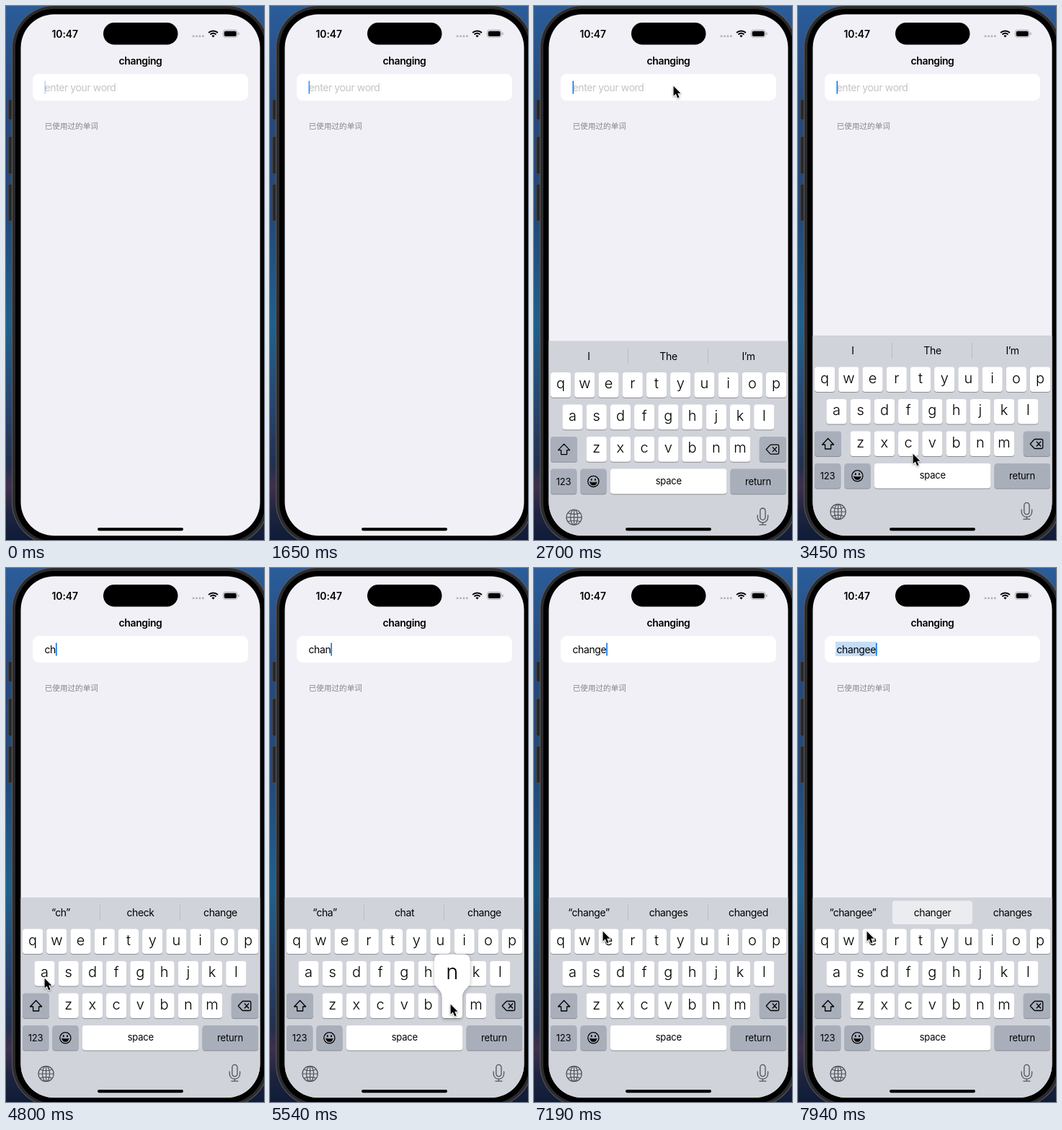
An HTML page with a canvas that plays this animation: 358 px wide and 739 px high, repeating every 8000 ms.

```html
<!DOCTYPE html>
<html lang="zh-CN">
<head>
<meta charset="utf-8">
<title>Word game</title>
<style>
  html, body { margin: 0; width: 100%; height: 100%; overflow: hidden; background: #000; }
  canvas { display: block; width: 358px; height: 739px; }
</style>
</head>
<body>
<canvas id="stage"></canvas>
<script>
const W = 358, H = 739, LOOP = 8000;
const canvas = document.getElementById('stage');
const ctx = canvas.getContext('2d');
const dpr = window.devicePixelRatio || 1;
canvas.width = Math.round(W * dpr);
canvas.height = Math.round(H * dpr);

const SANS = 'Inter, Roboto, sans-serif';
const BLUE = '#127cf5';
const KEY_W = 28.2, KEY_H = 34.6, KEY_PITCH = 33.22, ROW_PITCH = 44.5;
const KEYBOARD_TOP = 456;
const CENTERS = [76, 186.5, 297.5];

// Letter keys: name -> position
const keys = {};
[['qwertyuiop', 23], ['asdfghjkl', 39.4], ['zxcvbnm', 72.6]].forEach(([letters, left], row) =>
  [...letters].forEach((letter, i) => {
    keys[letter] = { x: left + i * KEY_PITCH, y: 499.5 + row * ROW_PITCH };
  }));

// [time, typed text, suggestions, middle one highlighted, pressed key]
const states = [
  [0, '', ['I', 'The', 'I’m']],
  [3750, 'c', ['I', 'The', 'I’m'], false, 'c'],
  [3900, 'c', ['“c”', 'can', 'cat']],
  [4500, 'ch', ['“c”', 'can', 'cat'], false, 'h'],
  [4650, 'ch', ['“ch”', 'check', 'change']],
  [4950, 'cha', ['“ch”', 'check', 'change'], false, 'a'],
  [5100, 'cha', ['“cha”', 'chat', 'change']],
  [5540, 'chan', ['“cha”', 'chat', 'change'], false, 'n'],
  [5690, 'chan', ['“chan”', 'Chan', 'change'], true],
  [6140, 'chang', ['“chan”', 'Chan', 'change'], true, 'g'],
  [6290, 'chang', ['“chang”', 'change', 'changes'], true],
  [7040, 'change', ['“chang”', 'change', 'changes'], true, 'e'],
  [7190, 'change', ['“change”', 'changes', 'changed']],
  [7640, 'changee', ['“change”', 'changes', 'changed'], false, 'e'],
  [7790, 'changee', ['“changee”', 'changer', 'changes'], true],
];

const pointerPath = [
  [2100, 193, 110], [3000, 193, 110], [3400, 159, 619], [3450, 159, 619],
  [3650, 156, 594], [4150, 156, 594], [4500, 217, 567], [4560, 217, 567],
  [4800, 53, 567], [5240, 53, 567], [5540, 250, 603], [5700, 250, 603],
  [6050, 197, 571], [6440, 197, 571], [6890, 95, 502], [8000, 95, 502],
];

const caretBlink = [
  [0, .32], [150, 0], [600, 0], [750, .5], [900, 1], [1050, .5], [1200, 0], [1500, 0],
  [1650, .8], [1800, 1], [1950, 1], [2100, .4], [2250, 0], [2400, 1], [8000, 1],
];

function sample(track, t, ease = u => u) {
  const i = Math.max(1, track.findIndex(point => point[0] >= t));
  const a = track[i - 1], b = track[i];
  const u = ease(Math.min(1, Math.max(0, (t - a[0]) / (b[0] - a[0]))));
  return a.slice(1).map((v, k) => v + (b[k + 1] - v) * u);
}
const smooth = u => u * u * (3 - 2 * u);

function box(x, y, w, h, r, fill) {
  ctx.beginPath();
  ctx.roundRect(x, y, w, h, r);
  ctx.fillStyle = fill;
  ctx.fill();
}

function text(str, x, y, { size = 14, weight = 400, color = '#000', align = 'center', spacing = -0.4, family = SANS } = {}) {
  ctx.font = `${weight} ${size}px ${family}`;
  ctx.letterSpacing = spacing + 'px';
  ctx.textAlign = align;
  ctx.fillStyle = color;
  ctx.fillText(str, x, y);
  return ctx.measureText(str).width;
}

function stroke(path, x, y, color, width, fill) {
  ctx.save();
  ctx.translate(x, y);
  ctx.lineWidth = width;
  ctx.lineJoin = ctx.lineCap = 'round';
  ctx.strokeStyle = color;
  const shape = new Path2D(path);
  ctx.stroke(shape);
  if (fill) {
    ctx.fillStyle = fill;
    ctx.fill(shape);
  }
  ctx.restore();
}

function drawPhone() {
  const sky = ctx.createLinearGradient(0, 0, 0, H);
  [[0, '#2a5d9a'], [.17, '#27497c'], [.4, '#234a7a'], [.6, '#20608a'], [.75, '#28456e'],
   [.86, '#22304f'], [.9, '#40304c'], [.95, '#1d2440'], [1, '#0f1b38']]
    .forEach(([stop, color]) => sky.addColorStop(stop, color));
  ctx.fillStyle = sky;
  ctx.fillRect(0, 0, W, H);

  [[129, 29], [180, 53], [246, 52]].forEach(([y, h]) => {
    box(3, y, 7, h, 1.5, '#4a4a4c');
    box(3.8, y + 1, 6, h - 2, 1, '#29292b');
  });
  box(8, -1, 357, 747, 59, '#5a5a5c');
  box(9, 0, 355, 745, 58, '#2b2b2d');
  box(13, 4, 347, 737, 54, '#000');
  box(20.5, 11.5, 332, 721.5, 46.5, '#f1f0f6');
}

function drawStatusBar() {
  text('10:47', 81.7, 43.5, { weight: 600, spacing: -0.1 });
  box(135, 23, 103.5, 30.5, 15.25, '#000');
  for (let i = 0; i < 4; i++) box(258.6 + i * 4.45, 40.4, 2.8, 2.8, 1.4, '#abaab0');

  ctx.strokeStyle = '#000';
  ctx.lineWidth = 2;
  [9, 5.6].forEach(r => {
    ctx.beginPath();
    ctx.arc(287.5, 43.4, r, -Math.PI * .75, -Math.PI * .25);
    ctx.stroke();
  });
  ctx.beginPath();
  ctx.moveTo(287.5, 43.6);
  ctx.arc(287.5, 43.4, 3, -Math.PI * .75, -Math.PI * .25);
  ctx.fillStyle = '#000';
  ctx.fill();

  ctx.beginPath();
  ctx.roundRect(301.3, 33.3, 19.8, 10, 3.2);
  ctx.strokeStyle = '#a2a1a7';
  ctx.lineWidth = .9;
  ctx.stroke();
  box(302.7, 34.7, 17, 7.2, 2, '#000');
  box(322.3, 36.7, 1.2, 3.4, .6, '#a2a1a7');
}

function drawForm(typed, selected, caretAlpha) {
  text('changing', 186.5, 81, { weight: 600 });
  box(37, 94, 299, 37, 8.5, '#fff');

  const left = { align: 'left' };
  ctx.font = `400 14px ${SANS}`;
  ctx.letterSpacing = '-0.4px';
  const width = typed ? ctx.measureText(typed).width : 0;
  if (selected) box(52, 102, width + 2, 20, 0, '#c5ddf9');
  if (typed) text(typed, 53.5, 118, left);
  else text('enter your word', 53.5, 118, { ...left, color: '#c4c4c7' });

  ctx.globalAlpha = caretAlpha;
  box(53.5 + width, 103.5, 1.7, 18.3, .8, BLUE);
  ctx.globalAlpha = 1;

  text('已使用过的单词', 53.7, 169.8, {
    ...left, size: 10.6, spacing: 0, color: '#85858a',
    family: '"Noto Sans CJK SC", "Noto Sans CJK", sans-serif',
  });
}

function drawKey(x, y, w, fill) {
  box(x, y + 1, w, KEY_H, 4, '#8b8d93');
  box(x, y, w, KEY_H, 4, fill);
}

function drawPopup(letter) {
  const { x, y } = keys[letter];
  const l = x - 10.7, r = x + KEY_W + 10.7, top = y - 54, bottom = y + KEY_H;
  ctx.save();
  ctx.shadowColor = 'rgba(0,0,0,.28)';
  ctx.shadowBlur = 5 * dpr;
  ctx.shadowOffsetY = dpr;
  ctx.fillStyle = '#fff';
  ctx.beginPath();
  ctx.moveTo(l, top + 8);
  ctx.arcTo(l, top, l + 8, top, 8);
  ctx.arcTo(r, top, r, top + 8, 8);
  ctx.lineTo(r, y - 17);
  ctx.bezierCurveTo(r, y - 6, x + KEY_W, y - 7, x + KEY_W, y + 6);
  ctx.arcTo(x + KEY_W, bottom, x, bottom, 4);
  ctx.arcTo(x, bottom, x, y, 4);
  ctx.lineTo(x, y + 6);
  ctx.bezierCurveTo(x, y - 7, l, y - 6, l, y - 17);
  ctx.fill();
  ctx.restore();
  text(letter, x + KEY_W / 2, y - 20, { size: 29, weight: 300, spacing: 0 });
}

function drawKeyboard(offset, suggestions, highlighted, pressed) {
  ctx.save();
  ctx.beginPath();
  ctx.roundRect(20.5, 11.5, 332, 721.5, 46.5);
  ctx.clip();
  ctx.translate(0, offset);
  box(20, KEYBOARD_TOP, 334, 290, 0, '#d0d3da');

  if (highlighted) box(131, 460.5, 111, 32.5, 4, '#ebecef');
  else [130.2, 241].forEach(x => box(x, 466, .9, 22, 0, '#b6b9c1'));
  suggestions.forEach((word, i) => text(word, CENTERS[i], 482));

  const gray = '#a9afba', small = { size: 13, spacing: -0.2 };
  for (const [letter, { x, y }] of Object.entries(keys)) {
    drawKey(x, y, KEY_W, '#fff');
    text(letter, x + KEY_W / 2, y + 22, { size: 20, weight: 300, spacing: 0 });
  }
  drawKey(23, 588.5, 37, gray);
  drawKey(312.8, 588.5, 37.2, gray);
  drawKey(23, 633, 36.3, gray);
  drawKey(64.5, 633, 36, gray);
  drawKey(106, 633, 161.5, '#fff');
  drawKey(272.6, 633, 77.4, gray);
  text('123', 41, 655, small);
  text('space', 186.8, 654, small);
  text('return', 311, 655, small);

  stroke('M0-7.5 L8 1 H4 V7 H-4 V1 H-8 Z', 41.6, 606, '#000', 1.3);
  stroke('M-9 0 L-3.5-6 Q-3-6.5-2-6.5 H6.5 Q8.5-6.5 8.5-4.5 V4.5 Q8.5 6.5 6.5 6.5 H-2 Q-3 6.5-3.5 6 Z M0-3 L5.5 3 M5.5-3 L0 3',
    331.2, 606, '#000', 1.3);
  stroke('M7.6 0 A7.6 7.6 0 1 1-7.6 0 A7.6 7.6 0 1 1 7.6 0', 82.4, 650.3, '#000', 1.3);
  stroke('M-4.7 1 Q0 2 4.7 1 Q4 5.2 0 5.2 Q-4 5.2-4.7 1 Z', 82.4, 650.3, '#000', .7, '#000');
  stroke('M-2.6-3 V-2 M2.6-3 V-2', 82.4, 650.3, '#000', 1.9);

  const icon = '#50545b';
  stroke('M10.6 0 A10.6 10.6 0 1 1-10.6 0 A10.6 10.6 0 1 1 10.6 0 M5 0 A5 10.6 0 1 1-5 0 A5 10.6 0 1 1 5 0 ' +
    'M0-10.6 V10.6 M-10.6 0 H10.6 M-8.5-6 Q0-2.8 8.5-6 M-8.5 6 Q0 2.8 8.5 6', 55.6, 700, icon, 1.2);
  stroke('M-3.6-8 A3.6 3.6 0 0 1 3.6-8 V1 A3.6 3.6 0 0 1-3.6 1 Z M-7.2-2 V1 A7.2 7.2 0 0 0 7.2 1 V-2 M0 8.2 V11.2 M-4.5 11.2 H4.5',
    317.4, 699, icon, 1.3);

  if (pressed) drawPopup(pressed);
  ctx.restore();
}

function drawPointer(x, y) {
  ctx.save();
  ctx.shadowColor = 'rgba(0,0,0,.4)';
  ctx.shadowBlur = 2.5 * dpr;
  ctx.shadowOffsetY = dpr;
  const arrow = 'M.6 .8 V14.6 L3.8 11.6 L6.2 17.2 L8.6 16.2 L6.2 10.7 H10.5 Z';
  stroke(arrow, x, y, '#fff', 1.8);
  ctx.restore();
  stroke(arrow, x, y, '#fff', 1.2, '#000');
}

// The screen updates in 150 ms steps, with one step cut short at 5240 ms.
function stepTime(t) {
  const start = t < 5240 ? 0 : 5240;
  return start + Math.floor((t - start) / 150) * 150;
}

function keyboardOffset(t) {
  const s = 18.3 * (t - 2400) / 1000;
  return s <= 0 ? 284 : 284 * (1 + s) * Math.exp(-s);
}

function draw(t) {
  const [, typed, suggestions, highlighted, pressed] = states.findLast(state => state[0] <= t);
  ctx.setTransform(dpr, 0, 0, dpr, 0, 0);
  drawPhone();
  drawStatusBar();
  drawForm(typed, highlighted, sample(caretBlink, t)[0]);
  if (t >= 2400) drawKeyboard(keyboardOffset(t), suggestions, highlighted, pressed);
  box(127, 722, 119, 4.2, 2.1, '#000');
  if (t >= 2100) drawPointer(...sample(pointerPath, t, smooth));
}

const started = performance.now();
function tick() {
  draw(stepTime((performance.now() - started) % LOOP));
  requestAnimationFrame(tick);
}
tick();
</script>
</body>
</html>
```
